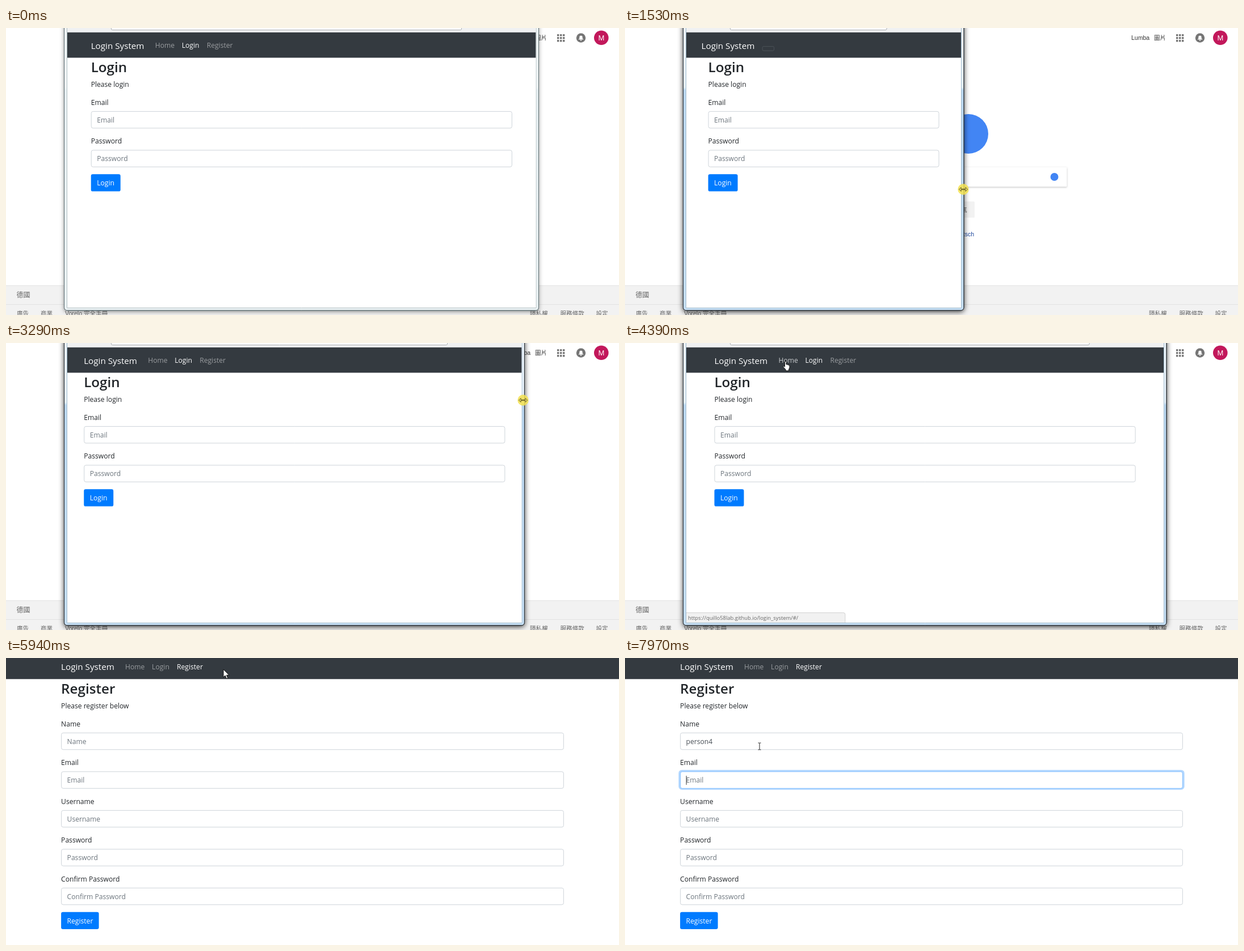
Animation of 1080x507 px, one loop 8000 ms. Source, as an HTML page with a canvas:

```html
<!DOCTYPE html>
<html lang="zh-Hant">
<head>
<meta charset="utf-8">
<title>Login System</title>
<style>
html, body { margin: 0; width: 100%; height: 100%; overflow: hidden; background: #fff; }
canvas { display: block; }
</style>
</head>
<body>
<canvas id="stage" width="1080" height="507"></canvas>
<script>
const c = document.getElementById('stage').getContext('2d');
const LOOP = 8000, SCALE = 0.798;
const UI = '"Open Sans", "Noto Sans", sans-serif';
const PORTAL = '"Liberation Sans", "Noto Sans CJK TC", "Noto Sans CJK", sans-serif';
const FIELDS = {
  login: ['Email', 'Password'],
  register: ['Name', 'Email', 'Username', 'Password', 'Confirm Password']
};
const SITE = 'https://quillo58lab.github.io/login_system/#/';

// Each entry changes the state from its time onward.
const timeline = [
  [0, { right: 939, page: 'login', active: false, cursor: null, menu: false, focus: -1, name: '', caret: false, status: null, statusDrop: 0, toggler: 0, full: false }],
  [180, { active: true, cursor: ['resize', 938, 285] }],
  [400, { right: 862, cursor: ['resize', 861, 285] }],
  [620, { right: 740, cursor: ['resize', 739, 285] }],
  [840, { right: 622, cursor: ['resize', 621, 285] }],
  [1060, { right: 541, cursor: ['resize', 539.5, 285.5] }],
  [1300, { right: 574, cursor: ['resize', 573, 285] }],
  [1520, { right: 597.5, cursor: ['resize', 596, 285] }],
  [1740, { cursor: ['arrow', 420, 152] }],
  [1960, { cursor: ['hand', 252, 34] }],
  [2180, { menu: true, toggler: 1 }],
  [2410, { menu: false }],
  [2630, { toggler: 0, cursor: ['resize', 596, 101] }],
  [2850, { right: 700, cursor: ['resize', 698, 101] }],
  [3070, { right: 815, cursor: ['resize', 812, 101] }],
  [3290, { right: 914, cursor: ['resize', 911, 101] }],
  [3490, { right: 946, cursor: ['resize', 943, 101] }],
  [3715, { right: 954.5, cursor: ['resize', 952, 101] }],
  [3940, { cursor: ['arrow', 720, 86] }],
  [4165, { cursor: ['arrow', 440, 62] }],
  [4390, { cursor: ['hand', 280, 32], status: '' }],
  [4830, { page: 'home' }],
  [5270, { cursor: ['hand', 383, 32], status: 'register' }],
  [5490, { page: 'register' }],
  [5940, { full: true, status: null, cursor: ['arrow', 383, 20] }],
  [6170, { cursor: ['hand', 320, 14], status: 'register' }],
  [6630, { cursor: ['arrow', 284, 47], statusDrop: 14 }],
  [6847, { cursor: ['text', 237, 156], status: null }],
  [7065, { focus: 0, caret: true }],
  [7282, { name: 'per' }],
  [7500, { name: 'person4' }],
  [7740, { focus: 1, caret: false }],
  [7970, { caret: true }]
];

function text(str, x, y, size, color, weight = 400, family = UI) {
  c.font = `${weight} ${size}px ${family}`;
  c.fillStyle = color;
  c.fillText(str, x, y);
}

function box(x, y, w, h, r, fill, stroke, line = 1) {
  c.beginPath();
  c.roundRect(x, y, w, h, r);
  if (fill) { c.fillStyle = fill; c.fill(); }
  if (stroke) { c.strokeStyle = stroke; c.lineWidth = line; c.stroke(); }
}

function disc(x, y, r, fill) {
  c.beginPath();
  c.arc(x, y, r, 0, 7);
  c.fillStyle = fill;
  c.fill();
}

function withShadow(color, blur, dy, paint) {
  c.save();
  c.shadowColor = color;
  c.shadowBlur = blur;
  c.shadowOffsetY = dy;
  paint();
  c.restore();
}

function drawPortal() {
  box(0, 0, 1080, 507, 0, '#fff');
  const label = (str, x, y, size = 10.5, color = '#666') => text(str, x, y, size, color, 400, PORTAL);
  label('Lumba', 892, 21, 10.5, '#333');
  label('圖片', 932, 21, 10.5, '#333');
  for (let i = 0; i < 9; i++) box(971 + i % 3 * 5, 11 + Math.floor(i / 3) * 5, 3.4, 3.4, 0, '#757575');
  disc(1013, 17.5, 8.2, '#757575');
  box(1010.3, 13.5, 5.4, 6.5, [3, 3, 0, 0], '#fff');
  box(1009, 19, 8, 1.4, 0, '#fff');
  disc(1013, 21.6, 1.1, '#fff');
  disc(1048.8, 17.3, 12.8, '#c2185b');
  text('M', 1043.4, 22, 13, '#fff', 400, PORTAL);

  disc(605, 187, 35, '#4285f4');
  withShadow('rgba(0,0,0,.25)', 3, 1, () => box(301, 246, 477.5, 34.5, 1.5, '#fff'));
  disc(756.5, 263, 7, '#4285f4');
  box(464, 306.5, 87, 28.5, 1.5, '#f2f2f2');
  box(558, 306.5, 58, 28.5, 1.5, '#f2f2f2');
  text('好手氣', 570.5, 325, 10.7, '#5c5c5c', 500, PORTAL);
  label('English', 534, 367.5, 10.5, '#1e479c');
  label('Deutsch', 576.5, 367.5, 10.5, '#1e479c');

  box(0, 455, 1080, 52, 0, '#f2f2f2');
  box(0, 454.5, 1080, 1, 0, '#e4e4e4');
  box(0, 488, 1080, 1, 0, '#e2e2e2');
  label('德國', 18.5, 476, 12);
  [['廣告', 19], ['商業', 61], ['Vorelo 完全手冊', 104], ['隱私權', 923], ['服務條款', 976.5], ['設定', 1039.5]]
    .forEach(([str, x]) => label(str, x, 508, 10.6));
}

function drawFrame({ right, active }) {
  const w = right - 102;
  withShadow(active ? 'rgba(0,0,0,.75)' : 'rgba(0,0,0,.4)', active ? 10 : 7, 2,
    () => box(102, -12, w, 511.5, 6, active ? '#30363b' : '#69787c'));
  const glass = c.createLinearGradient(0, 0, 0, 499);
  const tones = active ? ['#edf5fc', '#e6f1fb', '#bcd9f3', '#c6dff5'] : ['#f1f6f7', '#f1f6f7', '#e8f0f3', '#ecf3f5'];
  [0, 0.21, 0.22, 1].forEach((stop, i) => glass.addColorStop(stop, tones[i]));
  box(102.6, -12, w - 1.2, 510.8, 5, glass, active ? '#262c31' : '#607074');
  box(107.5, -10, right - 112.5, 504.5, 0, '#fff', active ? '#a3bccd' : '#b2bfc2');
  box(108, -10, right - 113.5, 18, 0, '#f0f1f2');
  box(185.5, -10, right - 322, 13.5, 2, '#fff', '#a9acb0');
}

function layout(left, width) {
  const sizes = [[576, 540], [768, 720], [992, 960], [1200, 1140]].filter(([min]) => width >= min * SCALE);
  const wide = width >= 992 * SCALE;
  const container = sizes.length ? sizes.pop()[1] * SCALE : width;
  const edge = left + (width - container) / 2;
  const pad = 15 * SCALE;
  return {
    wide,
    x: edge + pad,
    inner: container - 2 * pad,
    brand: wide ? edge + pad : container === width ? edge + 12.8 : edge
  };
}

function drawNav(s, left, top, width, l) {
  const names = ['Home', 'Login', 'Register'];
  const open = s.menu && !l.wide;
  box(left, top, width, open ? 139.5 : 44.6, 0, '#343a40');
  text('Login System', l.brand, top + 28.7, 15.2, '#fff');
  names.forEach((name, i) => {
    const current = name.toLowerCase() === s.page;
    const hover = s.status !== null && !s.statusDrop && name.toLowerCase() === (s.status || 'home');
    const color = current ? '#fff' : hover ? '#c9cbcd' : '#999c9f';
    if (l.wide) text(name, l.brand + [113, 160, 204][i], top + 27.2, 12.1, color);
    else if (open) text(name, l.brand, top + 59 + i * 32, 12.1, color);
  });
  if (!l.wide) box(l.brand + 107.5, top + 24.8, 20.5, 7.5, 2, null, s.toggler ? '#3c75ae' : '#4c5258', s.toggler ? 1.4 : 1);
  return top + (open ? 139.5 : 44.6);
}

function drawForm(s, y, { x, inner }) {
  const isLogin = s.page === 'login';
  const title = isLogin ? 'Login' : 'Register';
  const fields = FIELDS[s.page];
  text(title, x, y + 25.5, 24.2, '#212529', 600);
  text(isLogin ? 'Please login' : 'Please register below', x, y + 51.5, 12.1, '#212529');
  fields.forEach((field, i) => {
    const top = y + 94.6 + i * 68.5;
    const focused = s.focus === i;
    const value = field === 'Name' ? s.name : '';
    text(field, x, top - 11.3, 12.1, '#212529');
    if (focused) box(x - 1, top - 1, inner + 2, 31.5, 4, null, 'rgba(0,123,255,.3)', 3.5);
    box(x + 0.5, top + 0.4, inner - 1, 29.5, 3.2, '#fff', focused ? '#80bdff' : '#ced4da');
    text(value || field, x + 10.5, top + 19.6, 12.1, value ? '#495057' : '#6c757d');
    if (focused && s.caret) {
      const offset = value ? c.measureText(value).width : 0;
      box(x + 10.5 + offset, top + 7.5, 1, 16, 0, '#333');
    }
  });
  const buttonY = y + 68.9 + fields.length * 68.5;
  box(x, buttonY, isLogin ? 52 : 66.5, 30.3, 3.2, '#007bff');
  text(title, x + 10.5, buttonY + 19.9, 12.1, '#fff');
}

function drawStatus(s, left, bottom, width) {
  const top = bottom - 18 + s.statusDrop;
  box(left - 1, top + 0.5, width / 3 + 0.5, 22, [0, 3, 0, 0], '#f1f1f1', '#d2d2d2');
  text(SITE + s.status, left + 3, top + 13, 9.4, '#666');
}

function drawPage(s) {
  const left = s.full ? 0 : 108;
  const top = s.full ? -7.3 : 7.8;
  const width = s.full ? 1080 : s.right - 113.4;
  const bottom = s.full ? 507 : 494;
  const l = layout(left, width);
  c.save();
  c.beginPath();
  c.rect(left, 0, width, bottom);
  c.clip();
  box(left, 8, width, 500, 0, '#fff');
  const y = drawNav(s, left, top, width, l);
  if (s.page === 'home') {
    text('Server is inactive!!!', l.x, y + 31.5, 30, '#212529', 600);
    text('Please wait for ~30s!', l.x, y + 76, 30, '#212529', 600);
  } else drawForm(s, y, l);
  if (s.status !== null) drawStatus(s, left, bottom, width);
  c.restore();
}

const pointers = {
  arrow: ['M0 0V14L3.2 11L5.5 16.5L7.8 15.5L5.5 10.3H10Z', '#fff', '#111'],
  hand: ['M1.5 1Q3 -.5 4 1V6Q5.5 5 6.2 6.5Q7.5 5.8 8.2 7.2Q9.6 6.8 10 8V12L8.5 14.5V17H3V14.8L-1 10.5Q-1.5 8.5 .2 8.8L1.5 10Z', '#fff', '#111'],
  text: ['M-2.5 -6H-.7L0 -5.4L.7 -6H2.5M0 -5.4V5.4M-2.5 6H-.7L0 5.4L.7 6H2.5', null, '#222'],
  resize: ['M-7.5 0L-4 -3.5V-.7H4V-3.5L7.5 0L4 3.5V.7H-4V3.5Z', '#f3e46a', '#5d5722']
};

function drawCursor([kind, x, y]) {
  const [shape, fill, stroke] = pointers[kind];
  const path = new Path2D(shape);
  if (kind === 'resize') disc(x, y, 9.7, 'rgba(243,226,80,.85)');
  c.save();
  c.translate(x, y);
  if (fill) { c.fillStyle = fill; c.fill(path); }
  c.strokeStyle = stroke;
  c.lineWidth = 1;
  c.stroke(path);
  c.restore();
}

function render(now) {
  const t = now % LOOP;
  const s = Object.assign({}, ...timeline.filter(([start]) => start <= t).map(([, change]) => change));
  if (!s.full) {
    drawPortal();
    drawFrame(s);
  }
  drawPage(s);
  if (s.cursor) drawCursor(s.cursor);
}

const begin = performance.now();
function tick() {
  render(performance.now() - begin);
  requestAnimationFrame(tick);
}
tick();
</script>
</body>
</html>
```
